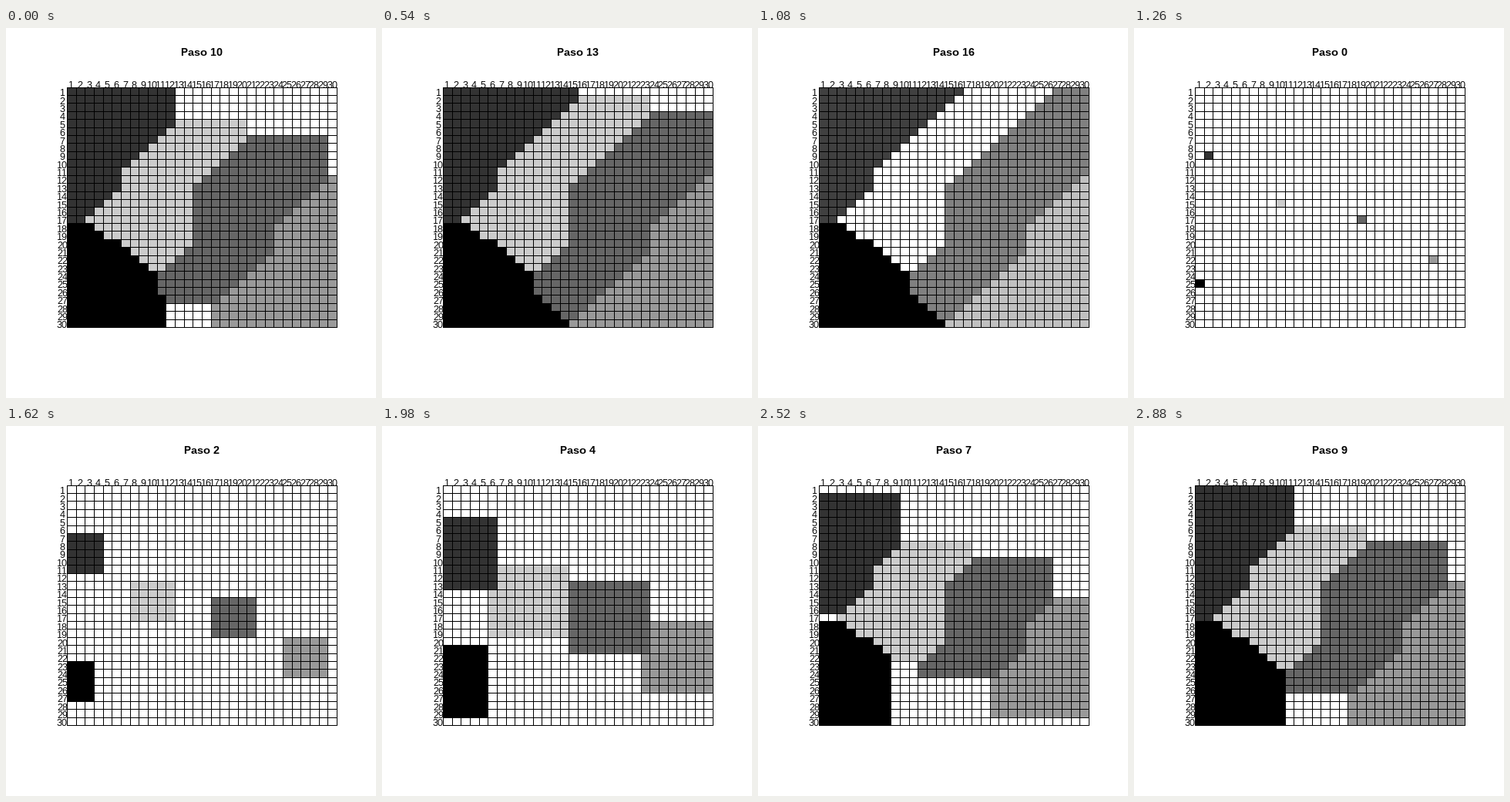
A matplotlib script for the animation above (3060 ms loop, 480 px wide and 480 px high).

```python
import matplotlib.pyplot as plt
import numpy as np
from matplotlib.animation import FuncAnimation

SIZE, N = 480, 30
STEPS, FIRST_STEP, INTERVAL = 17, 10, 180

# Plot region in pixels; rows and columns run over 0..31 with a 4% pad
LEFT, RIGHT, TOP, BOTTOM = 59.04, 449.76, 59.04, 406.56
DX = (RIGHT - LEFT) / 1.08 / (N + 1)
DY = (BOTTOM - TOP) / 1.08 / (N + 1)
X0 = LEFT + 0.04 * DX * (N + 1)
Y0 = TOP + 0.04 * DY * (N + 1)
LABEL_SHIFT = (-0.5, 6)   # from a label's anchor to its baseline centre

# (row, column, grey level); earlier seeds win ties
SEEDS = [(9, 2, 1), (25, 1, 0), (15, 10, 4), (17, 19, 2), (22, 27, 3)]
EMPTY = 5

plt.rcParams.update({
    "font.family": "Liberation Sans",
    "text.hinting": "native",
    "text.hinting_factor": 1,
})

index = np.arange(1, N + 1)
rows, cols = np.meshgrid(index, index, indexing="ij")
dists = np.array([np.maximum(abs(rows - r), abs(cols - c)) for r, c, _ in SEEDS])
owner = np.array([level for _, _, level in SEEDS])[dists.argmin(axis=0)]
reach = dists.min(axis=0)


def shades(step):
    """Grey of every cell, rescaled to the levels in use."""
    levels = np.where(reach <= step, owner, EMPTY)
    return levels / levels.max()


fig = plt.figure(figsize=(SIZE / 72, SIZE / 72), dpi=72, facecolor="white")
ax = fig.add_axes([0, 0, 1, 1])
ax.set_xlim(0, SIZE)
ax.set_ylim(SIZE, 0)
ax.axis("off")

edges = np.arange(N + 1) + 0.5
xs = np.floor(X0 + DX * edges)
ys = np.floor(Y0 + DY * edges)
mesh = ax.pcolormesh(xs, ys, shades(FIRST_STEP), cmap="gray", vmin=0, vmax=1,
                     antialiased=False, edgecolors="none")

# Lines sit on pixel centres already, so snapping would move them
line_style = dict(colors="black", lw=1, snap=False, zorder=2)
ax.vlines(xs + 0.5, ys[0], ys[-1] + 1, **line_style)
ax.hlines(ys + 0.5, xs[0], xs[-1] + 1, **line_style)


def label(x, y, text, **style):
    return ax.text(x, y, text, ha="center", va="baseline", zorder=3, **style)


for i in index:
    for x, y in ((X0 + DX * i, Y0), (X0, Y0 + DY * i)):
        label(x + LABEL_SHIFT[0], y + LABEL_SHIFT[1], str(i), fontsize=12)
title = label((LEFT + RIGHT) / 2, 36, "", fontsize=14, weight="bold")


def update(frame):
    step = (FIRST_STEP + frame) % STEPS
    mesh.set_array(shades(step))
    title.set_text(f"Paso {step}")
    return mesh, title


anim = FuncAnimation(fig, update, frames=STEPS, interval=INTERVAL, repeat=True, repeat_delay=0)
plt.show()
```
